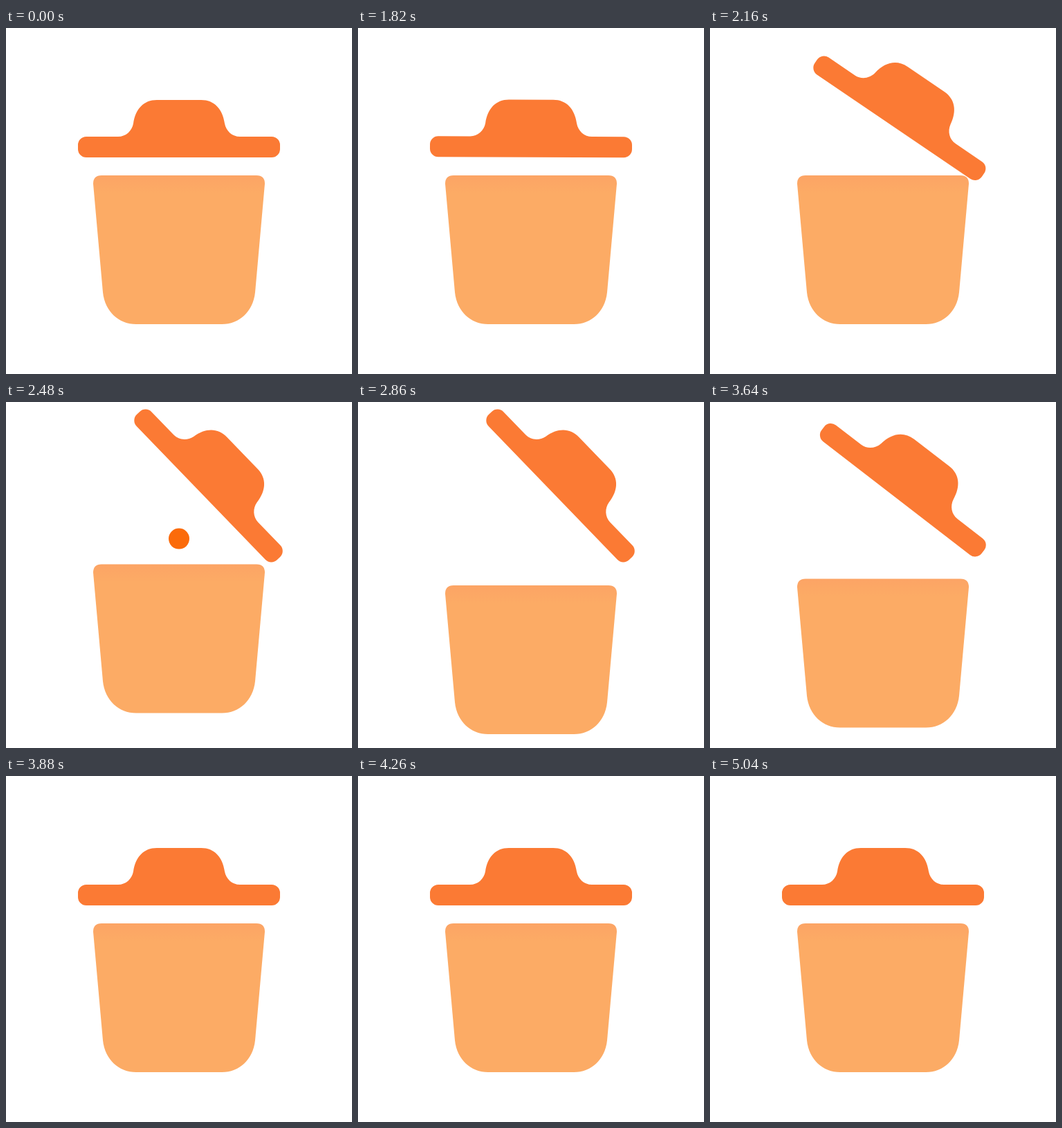
An HTML page that plays this animation: 500 by 500 pixels, repeating every 6 s.

```html
<!DOCTYPE html>
<html lang="en">
<head>
<meta charset="utf-8">
<title>Bin</title>
<style>
  html, body { margin: 0; width: 100%; height: 100%; overflow: hidden; background: #fff; }
  svg { display: block; width: 100%; height: 100%; }
</style>
</head>
<body>
<svg viewBox="0 0 500 500">
  <defs>
    <linearGradient id="shade" x2="0" y2="1">
      <stop offset="0" stop-color="#fca465"/>
      <stop offset=".12" stop-color="#fcab65"/>
    </linearGradient>
  </defs>
  <circle id="ball" cx="250" r="15" fill="#fb6b0a"/>
  <path id="bin" fill="url(#shade)" d="M138 213H362Q374 213 374 225L360 382C357 410 337 428 312 428H188C163 428 143 410 140 382L126 225Q126 213 138 213Z"/>
  <path id="lid" fill="#fb7a34" d="M116 157H162C173 157 182 149 184 138C187 117 199 104 218 104H282C301 104 313 117 316 138C318 149 327 157 338 157H384A12 12 0 0 1 396 169V175A12 12 0 0 1 384 187H116A12 12 0 0 1 104 175V169A12 12 0 0 1 116 157Z"/>
</svg>
<script>
const LOOP = 6000, DROP = 52, PEAK = 65, TILT = 46;
const [ball, bin, lid] = ['ball', 'bin', 'lid'].map(id => document.getElementById(id));

const ramp = (t, from, to) => Math.min(1, Math.max(0, (t - from) / (to - from)));
const smooth = (t, from, to) => {
  const p = ramp(t, from, to);
  return p * p * (3 - 2 * p);
};

function draw(t) {
  const closing = smooth(t, 3573, 3823);

  // The lid swings on its right end while it sinks.
  const open = smooth(t, 1800, 2340) - closing;
  lid.setAttribute('transform', `translate(0 ${DROP * open}) rotate(${TILT * open} 392.6 170.6)`);

  // The ball falls with constant acceleration and stays hidden behind the bin.
  const fall = ramp(t, 2240, 2547);
  ball.setAttribute('cy', -15 + 345 * fall * fall);
  ball.setAttribute('visibility', fall > 0 && fall < 1 ? 'visible' : 'hidden');

  // The bin sinks, overshoots and settles before it rises again.
  const sink = PEAK * ramp(t, 2230, 2650) ** 2.15
    - (PEAK - DROP) * smooth(t, 2650, 2800)
    - DROP * closing;
  bin.setAttribute('transform', `translate(0 ${sink})`);
}

const start = performance.now();
function frame() {
  draw((performance.now() - start) % LOOP);
  requestAnimationFrame(frame);
}
frame();
</script>
</body>
</html>
```
